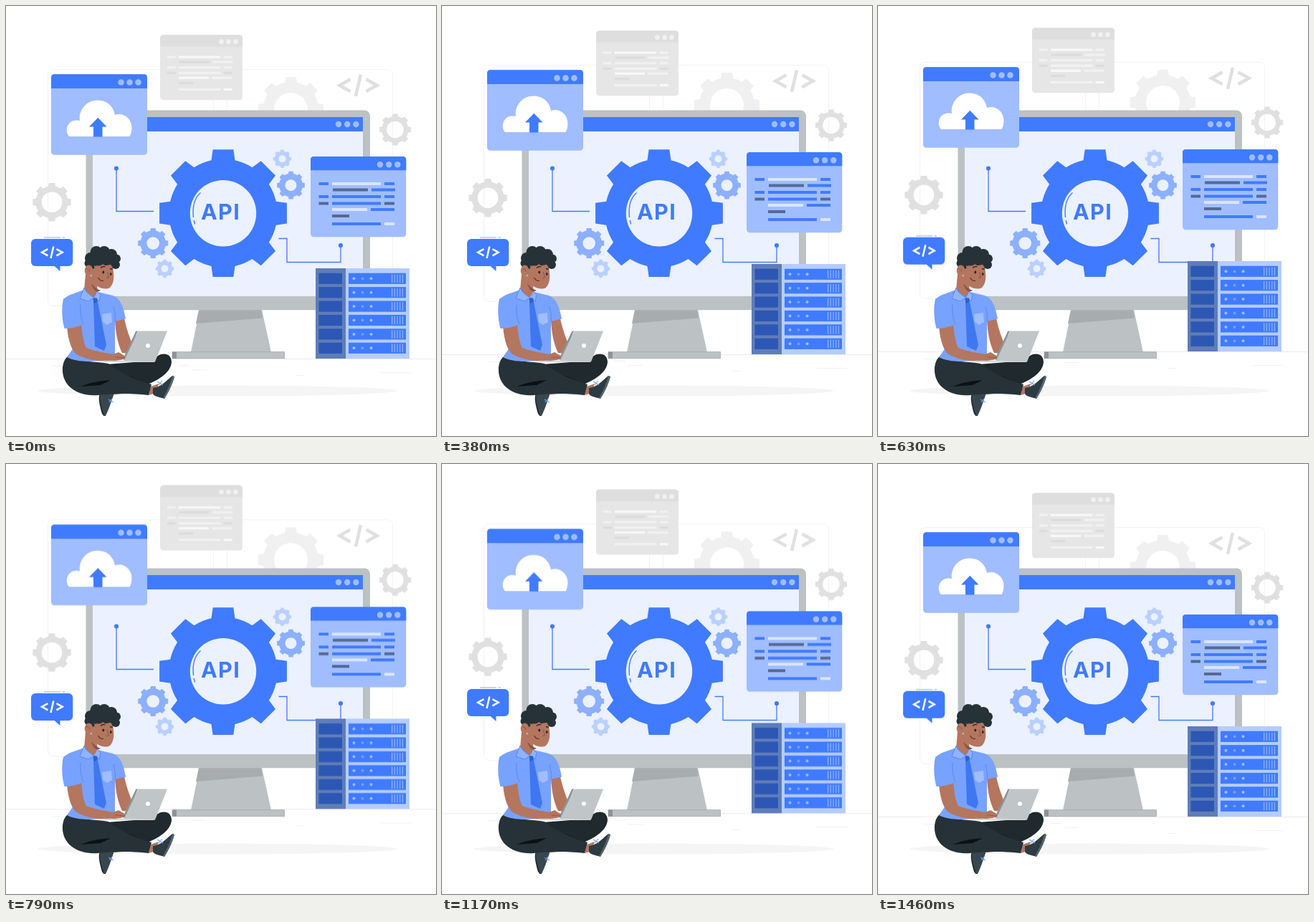
Recreate the animation shown at these times as an HTML page. Size 600x600 px, loop 1500 ms.

```html
<!DOCTYPE html>
<html lang="en">
<head>
<meta charset="utf-8">
<title>API illustration</title>
<style>
html, body { margin: 0; width: 100%; height: 100%; overflow: hidden; background: #fff; }
svg { display: block; width: 100vw; height: 100vh; }
text { font: 700 30.5px Inter, "Open Sans", sans-serif; letter-spacing: 1.3px; fill: #407bff; }
</style>
</head>
<body>
<svg viewBox="0 0 600 600">
  <g class="float" id="back"></g>
  <ellipse cx="295.500" cy="537" rx="251" ry="7.500" fill="#f5f5f5"/>
  <g id="monitor"></g>
  <g class="float" id="front"></g>
  <g id="bubble"></g>
  <g id="man"></g>
</svg>
<script>
const BLUE = '#407bff', SOFT = '#a0bdff', METAL = '#bcc1c4', GRAY = '#e0e0e0';
const SKIN = '#b4765f', DARK = '#263238', SHIRT = '#78a2ff';

const $ = id => document.getElementById(id);
const rect = (x, y, w, h, fill, rx = 0, more = '') =>
  `<rect x="${x}" y="${y}" width="${w}" height="${h}" rx="${rx}" fill="${fill}" ${more}/>`;
const path = (d, fill, more = '') => `<path d="${d}" fill="${fill}" ${more}/>`;
const line = (d, stroke, width = 1, more = '') =>
  `<path d="${d}" fill="none" stroke="${stroke}" stroke-width="${width}" ${more}/>`;
const dot = (x, y, r, fill) => `<circle cx="${x}" cy="${y}" r="${r}" fill="${fill}"/>`;
const dots = (xs, y, r, fill) => xs.map(x => dot(x, y, r, fill)).join('');
const range = n => [...Array(n).keys()];

// Eight-toothed wheel with a round hole
function gear(cx, cy, R, hole, fill) {
  const body = R * 0.85;
  const pt = (r, a) => `${(cx + r * Math.cos(a)).toFixed(2)} ${(cy + r * Math.sin(a)).toFixed(2)}`;
  let d = '';
  range(8).forEach(i => {
    const a = i * Math.PI / 4;
    d += `${i ? `A${body} ${body} 0 0 1 ` : 'M'}${pt(body, a - 0.22)}`;
    d += `L${pt(R * 1.012, a - 0.16)} L${pt(R * 1.012, a + 0.16)} L${pt(body, a + 0.22)}`;
  });
  d += `A${body} ${body} 0 0 1 ${pt(body, -0.22)}Z`;
  d += `M${cx - hole} ${cy}a${hole} ${hole} 0 1 0 ${2 * hole} 0a${hole} ${hole} 0 1 0 ${-2 * hole} 0Z`;
  return path(d, fill, 'fill-rule="evenodd"');
}

// Icon of angle brackets and a slash, 57 x 30 at scale 1
const codeIcon = (x, y, s, color) => `<g transform="translate(${x} ${y}) scale(${s})">` +
  line('M-11 -8.500L-26 0L-11 8.500M11 -8.500L26 0L11 8.500M3.500 -15L-3.500 15', color, 4.6) + '</g>';

function panel(x, y, w, h, bar, body, head) {
  return rect(x, y, w, h, body, 4.5) +
    path(`M${x} ${y + bar}v${4.5 - bar}q0 -4.500 4.500 -4.500h${w - 9}q4.500 0 4.500 4.500v${bar - 4.5}z`, head);
}

// Rows of code: vertical offset, then start, end and tone of each dash
const ROWS = [
  [38, 11.5, 25, 'a', 30, 98, 'b', 103, 117, 'a'],
  [46.5, 31, 80, 'c', 85, 118, 'a'],
  [56, 11.5, 25, 'a', 30, 98, 'a', 103, 117, 'a'],
  [65.5, 11.5, 25, 'c', 30, 98, 'a', 103, 117, 'c'],
  [74, 30, 79, 'b', 84, 117, 'a'],
  [83, 30, 54, 'c'],
  [94, 30, 98, 'a', 103, 117, 'b']
];
function codeRows(x, y, sx, sy, tones) {
  let out = '';
  for (const [dy, ...cells] of ROWS)
    for (let i = 0; i < cells.length; i += 3)
      out += rect(x + cells[i] * sx, y + (dy - 2) * sy, (cells[i + 1] - cells[i]) * sx, 4 * sy, tones[cells[i + 2]]);
  return out;
}

function server() {
  let out = rect(432, 366, 131, 126, '#b5ccff') + rect(432, 366, 42, 126, '#5f7db8');
  range(6).forEach(i => {
    const y = 372.7 + i * 19.4;
    out += rect(436.5, y, 32.5, 15.2, '#2c57b4') + rect(478, y, 80, 15.2, BLUE);
    out += dots([485.5, 509.5], y + 7.6, 2, SOFT) + dot(497.5, y + 7.6, 1.9, '#759fff');
    range(5).forEach(j => out += rect(538 + j * 3.7, y + 2, 1.3, 11.4, '#8fb2ff'));
  });
  return out;
}

$('back').innerHTML =
  [58.5, 308.5].map(x => rect(x, 88.5, 231, 330, 'none', 7, 'stroke="#f2f2f2"')).join('') +
  line('M0 492.500H600', '#ebebeb') +
  line('M523 511.500H565M405 515.500H417M259 507.500H280M65 502.500H84M240 501.500H256', '#f1f1f1') +
  panel(215, 40.5, 115, 90.7, 16, '#e6e6e6', '#dedede') +
  dots([300.5, 310.5, 320.5], 49.8, 3.5, '#f0f0f0') +
  codeRows(215, 40.5, 0.861, 0.808, { a: '#f1f1f1', b: '#f8f8f8', c: '#dcdcdc' }) +
  gear(397.5, 144.5, 45.5, 23.5, '#f0f0f0') +
  gear(543, 172.5, 22, 11.8, GRAY) +
  gear(64, 273.7, 26.7, 14.3, GRAY) +
  codeIcon(491.5, 110.7, 1, GRAY);

$('monitor').innerHTML =
  path('M270 424H357L370 483H258Z', METAL) +
  path('M269 424H356L358 435.500L265 443Z', '#a8acae') +
  rect(232, 482.7, 156.5, 9, METAL, 0, 'stroke="#a4a8aa" stroke-width=".8"') +
  rect(232, 482.7, 6, 9, '#8f9196') +
  rect(111.5, 145.5, 396.5, 278.8, METAL, 8) +
  rect(121, 155, 377, 250, '#ebf1ff') +
  rect(121, 155, 377, 20, BLUE) +
  dots([464, 476.2, 488.4], 165, 4.2, SOFT) +
  line('M154 226.500V286.500H206M380.500 324.500H392V357.500H467V334', BLUE, 1.3) +
  dots([154], 226.5, 3.1, BLUE) + dots([467], 334, 3.1, BLUE) +
  gear(303, 289.2, 89, 46.2, BLUE) +
  gear(397.5, 250.2, 19.4, 8, '#8cb0ff') +
  gear(385.5, 213.3, 12.7, 5, '#b9d0ff') +
  gear(205.2, 331, 21, 8.8, '#8cb0ff') +
  gear(221.5, 366.5, 12.7, 5, '#b9d0ff') +
  line('M271.500 260.500C263 268 260 281 261.500 295M262.200 299L263.600 304.500', BLUE, 1.4) +
  '<text x="272" y="298.300">API</text>';

$('front').innerHTML =
  panel(63, 95.3, 134, 112.5, 19.7, SOFT, BLUE) +
  dots([160.5, 172.5, 184.5], 106.5, 4.3, SOFT) +
  path('M88 182C82 176 84 160 98 159.500Q101 159.300 103 160C101 145 112 131.500 128 131.500C141 131.500 150 140 152 152C164 148 175.500 157 175.500 170Q175.500 177 172.500 182Z', '#fff') +
  path('M128.300 155.800L140.500 168.500H134.500V182.500H122V168.500H116Z', BLUE) +
  panel(425, 210, 133.3, 112.3, 19.3, SOFT, BLUE) +
  dots([522, 534.2, 546.3], 221.3, 4.2, SOFT) +
  codeRows(425, 210, 1, 1, { a: BLUE, b: '#d9e5ff', c: '#546a94' }) +
  server();

$('bubble').innerHTML =
  line('M53 323H76M78.500 323H82', '#9aa9c4', 1) +
  rect(35, 325, 58.3, 38, BLUE, 6) +
  path('M66.500 362H75.500V370Z', BLUE) +
  codeIcon(64.4, 343.7, 0.55, '#fff');

const legs =
  path('M143 534L162 533L160 541L145 543Z', SKIN) +
  path('M131 536L149 533L150 543C147 552 143 564 139 572L136 572C133 561 129 548 131 536Z', '#37474f') +
  path('M131 540C130 550 134 563 137 572L134 569C131 558 128 548 131 540Z', '#1c262b') +
  path('M202 531L213 527L209 540L199 543Z', SKIN) +
  path('M205 533C216 532 222 524 232 516L235 517C232 529 226 540 221 548C216 546 206 545 205 541Z', '#2d3b42') +
  path('M232 516L235 517C232 529 226 540 221 548L219 547C225 537 230 526 232 516Z', '#56666e') +
  line('M143 549L150 553M144 553L148 548M211 524L219 529M213 529L218 523', '#6f9bff', 1.1) +
  path('M140 500L205 495C213 482 231 482 231 497C230 511 214 521 200 527C183 533 160 538 140 537Z', '#1f292e') +
  path('M102 531C118 520 150 514 172 516L200 528L160 537L120 539Z', '#0c1114') +
  path('M86 489C104 497 128 496 143 499C157 511 180 521 203 528L199 543C170 540 150 541 128 543C98 545 77 529 79 504Q80 494 86 489Z', DARK) +
  path('M104 531C118 525 132 523 146 522L132 529Z', '#0c1114');

const torso =
  path('M152 439L165 436C168 450 173 464 177 473L172 485L162 484C156 472 153 456 152 439Z', SKIN) +
  path('M106 397C95 401 87 403 80 409L104 446L92 480L85 490C102 499 136 497 152 489L152 440L167 436.500C164 420 160 408 149 404L128 399Z', SHIRT) +
  path('M85 446L105 442C106 456 108 470 112 477C125 482 139 484 150 486L157 483L167 489L160 494L142 496C126 496 108 492 97 485C89 476 86 460 85 446Z', SKIN) +
  path('M80 409C77 422 78 438 81.500 450C91 450 99 448 108 444L104 417L92 404Z', SHIRT) +
  line('M104 417C103 427 105 437 108 444M150 419C152 427 153 433 152 440', '#5a89ee', 1) +
  path('M134 430L147 428L148 441L141 445L135 441Z', SOFT) +
  path('M111 374L126 380L128 400L122 406L109 397Z', SKIN) +
  path('M119 387Q124 394 132 397L127 399Q121 396 119 387Z', '#8d5544') +
  path('M109 393L103 408L115 412L123 407Q113 402 109 393ZM127 398L132 403L130 412L124 407Z', '#8fb3ff') +
  line('M109 393L103 408L115 412L123 407Q113 402 109 393M127 398L132 403L130 412L124 407', '#4a7ef0', 0.8) +
  path('M122 407L127 408L128 413L140 473L137 481L124 475L122 414Z', '#3f77f0') +
  path('M121.500 408L127 407.500L127.500 413L123 415Z', '#2d5fd0');

const curls = [
  [118, 352, 8], [115, 359, 5.5], [126, 343.5, 8.5], [137, 343, 8], [147, 347, 8], [154, 352.5, 6],
  [153, 361, 6], [129, 353, 9.5], [142, 354, 9], [120, 361, 6]
].map(([x, y, r]) => dot(x, y, r, DARK)).join('');

const head =
  path('M118 364C124 354 142 353 148 361C151 373 152 386 145 393C138 397 126 393 121 384Z', SKIN) +
  curls +
  path('M123 362C130 366 141 361 146 361L149 367L148 378L125 380Z', SKIN) +
  '<ellipse cx="115.500" cy="369" rx="5.800" ry="7.500" fill="' + SKIN + '"/>' +
  line('M112.500 367Q116 366 117 371', '#8d5544', 1) +
  line('M132 365.500Q135 362.500 138.500 364M145 366.500L149 367.500', DARK, 1.3) +
  '<ellipse cx="135.800" cy="371.500" rx="1.400" ry="2" fill="#20282c"/>' +
  '<ellipse cx="146.300" cy="374" rx="1.300" ry="1.900" fill="#20282c"/>' +
  line('M141.500 371L143.500 379L140 379.500', '#8d5544', 1) +
  line('M128.500 379Q131 384 136 383.500', '#5e2f24', 1.1);

const laptop =
  path('M132 495L207 494V497H136Z', '#d5d8d9') +
  path('M181 454L184 453L168 495L163 493Z', '#8d9396') +
  path('M184.500 453.500H225L208 496.500L165 494.500Z', '#c0c5c7') +
  dot(198, 474, 3, '#fff') +
  path('M139 489C147 485 157 484 166 489L164 493L150 495Z', SKIN) +
  line('M152 490L166 491', '#8d5544', 0.8);

$('man').innerHTML = legs + torso + head + laptop;

// Linear rise of 12 px and back, drawn at 24 poses a second
const LOOP = 1500, STEPS = 36, LIFT = 12, REST = 0.32;
const rise = ms => LIFT * (1 - Math.abs(1 - ms / (LOOP / 2)));
const play = (el, offset) => el.animate(
  range(STEPS + 1).map(i => ({
    offset: i / STEPS,
    transform: `translateY(${-offset((i % STEPS + 0.5) * LOOP / STEPS).toFixed(3)}px)`,
    easing: 'steps(1, end)'
  })),
  { duration: LOOP, iterations: Infinity, delay: -3.5 }
);

document.querySelectorAll('.float').forEach(el => play(el, ms => rise(ms) - REST));
play($('bubble'), ms => ms < 500 ? 0 : rise(ms - 500));
</script>
</body>
</html>
```
